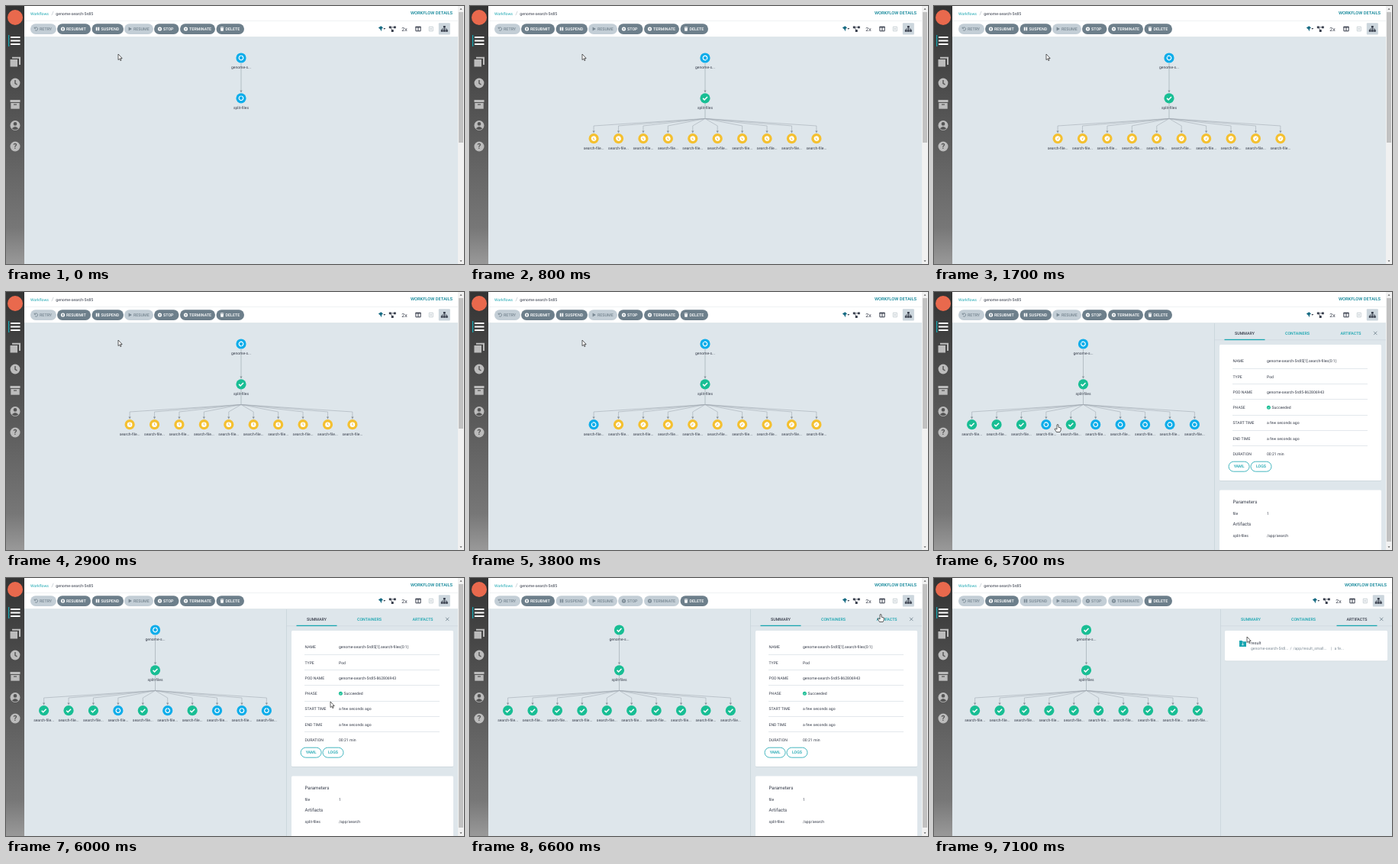
Write an HTML page that moves like this. It is 600 px wide and 338 px high and loops after 7.2 s.

```html
<!DOCTYPE html>
<html lang="en">
<head>
<meta charset="utf-8">
<title>Workflow details</title>
<style>
  html, body { margin: 0; width: 100%; height: 100%; overflow: hidden; background: #dee6eb; }
  svg { display: block; width: 600px; height: 338px; }
  text { font: 5.1px Roboto, sans-serif; fill: #363c4a; text-rendering: geometricPrecision; white-space: pre; }
</style>
</head>
<body>
<svg id="stage" viewBox="0 0 600 338"></svg>
<script>
const LOOP = 7200, STEP = 100;
const TEAL = '#18a5b0', BLUE = '#0dadea', GREEN = '#18be94', YELLOW = '#f4c030', SLATE = '#6d7f8b', INK = '#363c4a';
const OPEN = 5700, ALL_DONE = 6500, ARTIFACTS = 6800;
const runAt = [3500, 4900, 4100, 5300, 4400, 5000, 5200, 5500, 5600, 5700];
const doneAt = [4500, 5700, 5400, 6300, 5500, 6200, 5900, 6300, 6400, 6400];
// Pointer path: time, x, y
const pointer = [[0, 147, 63], [4900, 147, 63], [5500, 162, 174], [5700, 162, 174], [5900, 425, 162],
  [6300, 425, 162], [6600, 538, 48], [6800, 538, 48], [7100, 410, 77]];

const rect = (x, y, w, h, fill, extra = '') => `<rect x="${x}" y="${y}" width="${w}" height="${h}" fill="${fill}" ${extra}/>`;
const disc = (x, y, r, fill) => `<circle cx="${x}" cy="${y}" r="${r}" fill="${fill}"/>`;
const line = (d, color, width = 1) => `<path d="${d}" fill="none" stroke="${color}" stroke-width="${width}"/>`;
const shape = (d, fill) => `<path d="${d}" fill="${fill}"/>`;
const text = (x, y, s, style = '', anchor = 'start') => `<text x="${x}" y="${y}" text-anchor="${anchor}" style="${style}">${s}</text>`;
const at = (x, y, body, turn = 0) => `<g transform="translate(${x} ${y}) rotate(${turn})">${body}</g>`;

function sidebar() {
  const grey = '#bcbcbc', dark = '#555';
  return rect(0, 0, 24, 338, 'url(#nav)') + disc(12, 15, 10, '#e9694d') +
    rect(3, 38, 1.3, 15, TEAL) +
    line('M6 41H18.5M6 45.5H18.5M6 50H18.5', '#fff', 2.2) +
    rect(5.5, 70, 9.5, 9.5, grey) + line('M8 67.7H18V77', grey, 2) +
    disc(12, 101, 6.4, grey) + line('M12 97V101.3L14.5 103', dark, 1.4) +
    rect(5.5, 123, 13, 3, grey) + rect(6.3, 127, 11.4, 7.7, grey) + rect(10, 128.5, 4, 1.2, dark) +
    disc(12, 156.5, 6.5, grey) + disc(12, 154.4, 2.3, dark) + shape('M7.8 160.5Q12 155.5 16.2 160.5Q12 164 7.8 160.5Z', dark) +
    disc(12, 184, 6.5, grey) + text(12, 187.4, '?', `font-size:10px;font-weight:700;fill:${dark}`, 'middle');
}

const glyphs = {
  undo: c => line('M-1.7 -1.2A2.1 2.1 0 1 1 -1.4 1.6M-2.3 -2.4V-.7H-.6', c, .9),
  plus: (c, bg) => disc(0, 0, 2.6, c) + line('M-1.5 0H1.5M0 -1.5V1.5', bg, .8),
  pause: c => rect(-2.2, -2.3, 1.7, 4.6, c) + rect(.5, -2.3, 1.7, 4.6, c),
  play: c => shape('M-1.9 -2.5L2.4 0L-1.9 2.5Z', c),
  cross: (c, bg) => disc(0, 0, 2.6, c) + line('M-1 -1L1 1M-1 1L1 -1', bg, .8),
  trash: c => rect(-2.3, -2.4, 4.6, .9, c) + rect(-.8, -2.9, 1.6, .6, c) + shape('M-2 -1.1H2L1.7 2.7H-1.7Z', c),
};

function toolbar(t, right) {
  const over = t >= ALL_DONE;
  const buttons = [['RETRY', 32, 66, 'undo', 1], ['RESUBMIT', 67, 111, 'plus', 0], ['SUSPEND', 112.5, 154, 'pause', over],
    ['RESUME', 155, 193, 'play', 1], ['STOP', 194, 226.5, 'cross', over], ['TERMINATE', 228, 274, 'cross', over], ['DELETE', 275.5, 312, 'trash', 0]];
  const pills = buttons.map(([label, x, end, icon, off]) => {
    const bg = off ? '#c3ced6' : SLATE, fg = off ? '#798893' : '#fff';
    return rect(x, 23.3, end - x, 13.6, bg, 'rx="6.8"') + at(x + 7.5, 30, glyphs[icon](fg, bg)) +
      text(x + 12, 31.9, label, `font-size:5.35px;font-weight:500;fill:${fg}`);
  }).join('');
  const icons = rect(-7.5, -7.8, 15, 15.3, '#ccd6dd', 'rx="1"') +
    shape('M-1.4 -4H1.4V-1.5H-1.4ZM-4.5 1.2H-1.8V3.7H-4.5ZM-1.4 1.2H1.4V3.7H-1.4ZM1.8 1.2H4.5V3.7H1.8Z', INK) +
    line('M0 -2V1.5M-3.2 1.5V0H3.2V1.5', INK, .7) +
    line('M-20 -2.8H-15V2.8H-20ZM-19 0H-16M-17.5 -1.5V1.5', '#c3ccd2', .9) +
    line('M-37.4 -2.6H-31.2V2.8H-37.4ZM-34.3 -2.6V2.8', INK, 1) + rect(-37.8, -3.2, 7, 1.5, INK) +
    text(-52.3, 2.5, '2x', 'font-size:7px', 'middle') +
    shape('M-72.5 -3.6H-69.6V-.7H-72.5ZM-66.4 -3.6H-63.5V-.7H-66.4ZM-69.5 1H-66.6V3.9H-69.5Z', INK) +
    line('M-70 -2.1H-65M-70.2 -1.3L-68.3 2', INK, .7) +
    shape('M-86.5 -1.5L-83 -3.8L-80.3 -1.5L-82 -.3L-82.6 3.2L-84 .5Z', '#176b83') + shape('M-80 -.9H-77L-78.5 .8Z', INK);
  return rect(24, 0, 576, 41, '#fff') + rect(24, 19, 576, .6, '#e4e9ec') + rect(24, 40.4, 576, .7, '#d0d9df') +
    text(32, 11.6, 'Workflows', `fill:${TEAL}`) + line('M59.8 12.2L62.2 6.8', '#b4bec5', .6) + text(65.3, 11.6, 'genome-search-5rdl5', 'font-size:5.2px') +
    text(right - 7, 11.4, 'WORKFLOW DETAILS', 'font-size:5.75px;font-weight:500;fill:#0b8396', 'end') +
    pills + at(right - 17.7, 30, icons);
}

function node(x, y, label, phase, t) {
  const look = {
    pending: [YELLOW, disc(0, 0, 3.3, '#fff') + line('M0 -2V.3L1.1 1', YELLOW, .9), (t - 2900) * .2625],
    running: [BLUE, line('M.25 -2.8A2.8 2.8 0 1 1 -.25 -2.8', '#fff', 1.2), t * .18],
    done: [GREEN, line('M-2.9 .1L-.9 2.1L3 -1.9', '#fff', 1.5), 0],
  };
  const [color, icon, turn] = look[phase];
  return disc(x, y, 6.6, color) + at(x, y, icon, turn) + text(x, y + 13.8, label, 'font-size:5px', 'middle');
}

function graph(t, cx) {
  const edge = '#a3acb4';
  const head = (x, y) => shape(`M${x - 1.6} ${y - 3}H${x + 1.6}L${x} ${y}Z`, '#8b959e');
  const hasLeaves = t >= 500;
  let out = line(`M${cx} 75V113`, edge, .7) + head(cx, 113.5);
  if (hasLeaves) {
    out += line(`M${cx} 127V147.5`, edge, .7);
    for (let i = 0; i < 10; i++) {
      const x = cx + (i - 4.5) * 32.42;
      const phase = t >= doneAt[i] ? 'done' : t >= runAt[i] ? 'running' : 'pending';
      out += line(`M${cx} 147.5L${x} 157V165`, edge, .6) + head(x, 166.5) + node(x, 173.7, 'search-file...', phase, t);
    }
  }
  return out + node(cx, 68, 'genome-s...', t >= ALL_DONE ? 'done' : 'running', t) +
    node(cx, 120.8, 'split-files', hasLeaves ? 'done' : 'running', t);
}

const card = (x, y, w, h) => rect(x, y + .7, w, h, '#cbd5db', 'rx="1.5"') + rect(x, y, w, h, '#fff', 'rx="1.5"');

function summary() {
  const rows = [['NAME', 'genome-search-5rdl5[1].search-files(0:1)'], ['TYPE', 'Pod'], ['POD NAME', 'genome-search-5rdl5-862806943'],
    ['PHASE', 'Succeeded'], ['START TIME', 'a few seconds ago'], ['END TIME', 'a few seconds ago'], ['DURATION', '00:21 min']];
  const list = rows.map(([name, value], i) => {
    const y = 92.4 + i * 20.25, ok = name === 'PHASE';
    return text(391.5, y, name) + text(ok ? 442.5 : 436, y, value) + (i < 6 ? rect(391, Math.round(y + 7.4), 177, 1, '#e3e8ec') : '') +
      (ok ? disc(438.4, y - 1.8, 2.5, GREEN) + line(`M437.2 ${y - 1.8}l.9 .9l1.6 -1.7`, '#fff', .6) : '');
  }).join('');
  const pill = (x, w, label) => rect(x, 222.2, w, 13, '#fff', `rx="6.5" stroke="${TEAL}" stroke-width=".8"`) +
    text(x + w / 2, 230.4, label, `font-size:5.3px;font-weight:500;fill:${TEAL}`, 'middle');
  return card(374, 69, 212, 178) + list + pill(386.1, 27, 'YAML') + pill(415, 27, 'LOGS') +
    card(374, 259.5, 212, 80) + text(391.5, 277, 'Parameters', 'font-size:6.2px') + text(391.5, 291.5, 'file') + text(436, 291.5, '1') +
    text(391.5, 306, 'Artifacts', 'font-size:6.2px') + text(391.5, 320.5, 'split-files') + text(436, 320.5, '/app/search');
}

function artifacts() {
  const grey = 'fill:#7d8b96';
  return card(381, 69, 213, 39.5) + shape('M400 82H403.5L404.5 83.2H409V90H400Z', TEAL) +
    line('M404.5 84.4V88M403.2 86.8L404.5 88.2L405.8 86.8', '#fff', .7) +
    text(415, 86.8, 'result', 'font-size:5.4px') + text(415, 94, 'genome-search-5rdl...', grey) + text(466.5, 94, '/', grey) +
    text(470.5, 94, '/app/result_small...', grey) + text(520, 94, '|', grey) + text(524.5, 94, 'a fe...', grey);
}

function panel(t, right) {
  const x = right - 225, second = t >= ARTIFACTS;
  const tabs = ['SUMMARY', 'CONTAINERS', 'ARTIFACTS'].map((label, i) => {
    const active = i === (second ? 2 : 0), middle = x + [40, 109, 179][i];
    return text(middle, 55.6, label, `font-size:5.3px;font-weight:500;fill:${active ? INK : TEAL}`, 'middle') +
      (active ? rect(middle - 26.5, 61.8, 53, 1.3, TEAL) : '');
  }).join('');
  return rect(x, 41, 225, 297, '#dee6eb') + rect(x, 41, .7, 297, '#c5d0d7') + rect(x, 62.6, 225, .6, '#c8d2d9') + tabs +
    line(`M${x + 209} 51.7l4.4 4.4m0 -4.4l-4.4 4.4`, SLATE, .8) + (second ? artifacts() : summary());
}

const scrollbar = thumb => rect(592, 0, 8, 338, '#f1f1f1') + rect(593, 8, 6, thumb, '#c1c1c1') +
  shape('M594.5 4.7H597.5L596 2.8ZM594.5 333.3H597.5L596 335.2Z', '#666');

function cursor(t) {
  const i = Math.max(1, pointer.findIndex(p => p[0] > t));
  const last = pointer[pointer.length - 1];
  const [a, b] = t >= last[0] ? [last, last] : [pointer[i - 1], pointer[i]];
  const k = a === b ? 0 : (t - a[0]) / (b[0] - a[0]), ease = k * k * (3 - 2 * k);
  const hand = (t >= 5400 && t < 5800) || (t >= 6600 && t < 6900);
  const d = hand ? 'M-1 0Q0 -1 1 0V3.2L4.2 4V7L3 9.5H-1.5L-4 5.5Q-3 4.3 -1 6Z' : 'M0 0V7.6L1.7 6L2.9 8.6L4.1 8L2.9 5.5H5.2Z';
  return at(a[1] + (b[1] - a[1]) * ease, a[2] + (b[2] - a[2]) * ease, `<path d="${d}" fill="#fff" stroke="#222" stroke-width=".7"/>`);
}

const nav = '<defs><linearGradient id="nav" x2="0" y2="1"><stop stop-color="#333"/><stop offset=".86" stop-color="#777"/><stop offset="1" stop-color="#999"/></linearGradient></defs>';
const stage = document.getElementById('stage');

function draw(t) {
  const right = t >= ARTIFACTS ? 600 : 592, open = t >= OPEN;
  const center = open ? 195.5 + (right - 592) / 2 : 308;
  stage.innerHTML = nav + rect(0, 0, 600, 338, '#dee6eb') + graph(t, center) + toolbar(t, right) +
    (open ? panel(t, right) : '') + (right < 600 ? scrollbar(open ? 319 : 171) : '') + sidebar() + cursor(t);
}

let shown = -1;
function tick() {
  const t = Math.floor(performance.now() % LOOP / STEP) * STEP;
  if (t !== shown) draw(shown = t);
  requestAnimationFrame(tick);
}
tick();
</script>
</body>
</html>
```
